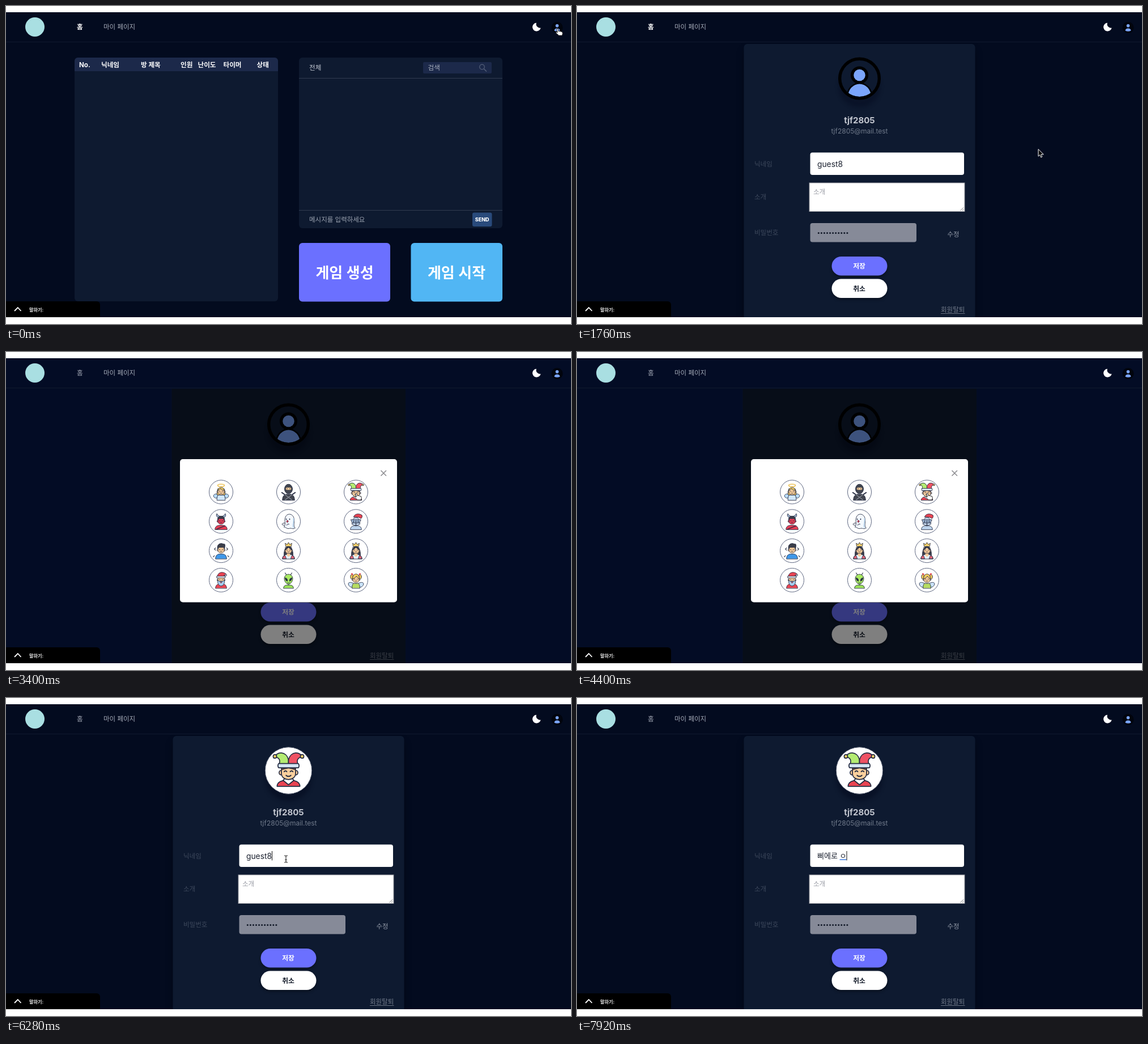
An HTML page with a canvas that plays this animation: 997x561 px, repeating every 8000 ms.

```html
<!DOCTYPE html>
<html lang="ko">
<head>
<meta charset="utf-8">
<title>Profile settings</title>
<style>
html, body { margin: 0; width: 100%; height: 100%; overflow: hidden; background: #fff; }
canvas { display: block; width: 997px; height: 561px; }
</style>
</head>
<body>
<canvas id="stage"></canvas>
<script>
const W = 997, H = 561, LOOP = 8000;
const FONT = 'Inter, "Noto Sans CJK KR", "Noto Sans KR", sans-serif';
const canvas = document.getElementById('stage');
const c = canvas.getContext('2d');
const dpr = window.devicePixelRatio || 1;
canvas.width = W * dpr;
canvas.height = H * dpr;

const INK = '#252c42', SKIN = '#fccf9c', BLUE = '#7ba5fb', PANEL = '#0e1a30';
const BG = '#030b1f', BG_MODAL = '#030c25';
const PAGE = 600, MODAL = 2280, PICK = 5800, FOCUS = 6240;

// drawing helpers
function box(x, y, x2, y2, r, fill) {
  c.beginPath();
  c.roundRect(x, y, x2 - x, y2 - y, r);
  c.fillStyle = fill;
  c.fill();
}
function text(s, x, cy, size, color, weight = 400, align = 'left') {
  c.font = `${weight} ${size}px ${FONT}`;
  c.textAlign = align;
  c.fillStyle = color;
  c.fillText(s, x, cy + size * 0.37);
  return c.measureText(s).width;
}
function line(d, color, width = 1) {
  c.strokeStyle = color;
  c.lineWidth = width;
  c.stroke(new Path2D(d));
}
function shape(d, fill, edge = INK, width = 0.9) {
  c.fillStyle = fill;
  c.fill(new Path2D(d));
  if (edge) line(d, edge, width);
}
function oval(x, y, rx, ry, fill, edge, width = 0.9) {
  c.beginPath();
  c.ellipse(x, y, rx, ry, 0, 0, 7);
  if (fill) { c.fillStyle = fill; c.fill(); }
  if (edge) { c.strokeStyle = edge; c.lineWidth = width; c.stroke(); }
}
function at(x, y, scale, draw) {
  c.save();
  c.translate(x, y);
  c.scale(scale, scale);
  c.lineCap = c.lineJoin = 'round';
  draw();
  c.restore();
}
function shadow(color, blur, dy, draw) {
  c.save();
  c.shadowColor = color;
  c.shadowBlur = blur * dpr;
  c.shadowOffsetY = dy * dpr;
  draw();
  c.restore();
}

// avatar parts, drawn around 0,0
function face(y, skin = SKIN, scale = 0.85) {
  at(0, y, scale, () => {
    oval(-7, 1, 1.6, 2, skin, INK);
    oval(7, 1, 1.6, 2, skin, INK);
    shape('M-6.5 -6H6.5V2C6 9 -6 9 -6.5 2Z', skin);
    line('M-4 0q1.2 -1.4 2.4 0M1.6 0q1.2 -1.4 2.4 0M-2.2 3.4q2.2 2 4.4 0', INK);
  });
}
function shoulders(fill, w = 10, y = 9) {
  shape(`M${-w} 14.5C${-w} ${y + 1} -5 ${y} -3 ${y}H3C5 ${y} ${w} ${y + 1} ${w} 14.5Z`, fill);
}
const people = {
  angel() {
    shape('M-5 4C-17 1 -15 12 -8 11ZM5 4C17 1 15 12 8 11Z', '#b9dcfb');
    shoulders('#cfe6fc', 7.5, 5);
    shape('M-7 5C-11 -12 11 -12 7 5Z', '#f8cf5e');
    face(-1);
    shape('M-6 -3C-5 -10 5 -10 6 -3Q1 -3 -1 -6Q-3 -3 -6 -3Z', '#f8cf5e');
    oval(0, -12, 6, 2.2, null, '#e9b83b', 1.4);
  },
  ninja() {
    line('M-12 1L7 14M12 1L-7 14', INK, 2);
    shoulders('#41454f', 11, 4);
    line('M-6 5L6 14M6 5L-6 14', '#8d929c', 1.2);
    oval(0, -5.5, 7.2, 8.5, '#41454f', INK);
    box(-4.8, -8, 4.8, -3.8, 2, SKIN);
    oval(-2.4, -5.8, 0.8, 0.8, INK);
    oval(2.4, -5.8, 0.8, 0.8, INK);
  },
  jester() {
    shoulders('#e94452', 10.5, 9);
    shape('M-5 9L0 13L5 9L3 7H-3Z', '#fff');
    face(1, SKIN, 1);
    shape('M-7 -3H7V0L4 -1L0 -2L-4 -1L-7 0Z', '#4b3f45', null);
    shape('M-8.5 -6C-7 -11 -10 -13 -13.5 -11.5C-11 -18 -2 -18 0 -10V-6Z', '#b4ec72');
    shape('M8.5 -6C7 -11 10 -13 13.5 -11.5C11 -18 2 -18 0 -10V-6Z', '#ef5264');
    shape('M-9 -6.5H9Q10.5 -4.5 9 -2.5H-9Q-10.5 -4.5 -9 -6.5Z', '#d5e5f5');
    oval(-12.5, -13, 1.6, 1.6, '#ffd567', INK);
    oval(12.5, -13, 1.6, 1.6, '#ffd567', INK);
  },
  devil() {
    shoulders('#e63e55', 11, 7);
    line('M-8 14L7 8', INK, 1.4);
    shape('M-5 -7C-9 -8 -9 -12 -7.5 -14Q-6 -10 -2 -9ZM5 -7C9 -8 9 -12 7.5 -14Q6 -10 2 -9Z', '#9fb4cf');
    face(-1, '#e63e55');
    shape('M-6 -2C-8 -12 8 -12 6 -2L4 -5H-4Z', '#3b3e49');
  },
  ghost() {
    shape('M-8 10C-4 5 -8 -1 -6 -6C-4 -16 9 -15 10 -4C11 4 8 8 12 12C7 15 5 11 1 13C-3 14 -5 10 -8 10Z', '#f4f9ff');
    line('M9 -5C10 4 6 8 9 11', '#c3ddf5', 2);
    oval(-4, -4, 0.9, 1.2, INK);
    oval(2, -4, 0.9, 1.2, INK);
    oval(-2, 0, 1.6, 2, '#e63e55', INK, 0.6);
    line('M-7 3C-13 3 -13 7 -8 7M1 5Q-3 4 -3 7', INK);
  },
  knight() {
    shoulders('#bdd4ed', 10, 8);
    shape('M-4 -8C-3 -14 6 -15 11 -11Q12 -7 9 -5Q7 -8 -4 -8Z', '#e94452');
    shape('M-7 5C-8 -11 8 -11 7 5Q0 10 -7 5Z', '#c9dcf3');
    shape('M-9 -3H9L6 3H-6Z', '#9fb8d6');
    line('M-4 -1V2M0 -1V2M4 -1V2M0 3V8', INK, 1.2);
  },
  boy() {
    shoulders('#3f97e8', 10, 6);
    face(-2);
    shape('M-6 -3C-9 -12 0 -15 4 -12Q9 -14 6 -3L5 -6H-4Z', '#3b3e49');
    line('M-10 -5L-12 -3L-10 -1M10 -5L12 -3L10 -1M-12 9L-14 11M12 9L14 11', INK, 1.2);
  },
  princess() {
    shape('M-8 10C-10 -14 10 -14 8 10Z', '#3b3e49');
    shoulders('#e3f0fc', 11, 7);
    shape('M-11 14Q-9 8 -6 9L-4 14ZM11 14Q9 8 6 9L4 14Z', '#ee6476');
    shape('M-3 5H3V8L0 11L-3 8Z', SKIN, null);
    face(-1);
    shape('M-6 -1C-6 -9 6 -9 6 -1Q3 -3 0 -6Q-3 -3 -6 -1Z', '#3b3e49');
    shape('M-5 -8L-6 -13.5L-2.5 -11L0 -15L2.5 -11L6 -13.5L5 -8Z', '#ffd567');
  },
  elder() {
    shoulders('#e94452', 10, 7);
    face(-1);
    shape('M-6 0L-4 2H4L6 0C8 14 -8 14 -6 0Z', '#a9cdee');
    oval(0, 4, 1.6, 0.9, '#e94452', INK, 0.6);
    shape('M-7 -6C-6 -15 4 -16 9 -11L8 -8L5 -9L7 -6Z', '#e94452');
    shape('M-7.5 -7H7.5V-4H-7.5Z', '#f4f9ff');
    oval(8.5, -9, 1.6, 1.6, '#f4f9ff', INK);
  },
  alien() {
    line('M-3 -8L-6 -13M3 -8L6 -13', INK, 1.1);
    shoulders('#9be158', 9, 9);
    shape('M0 8C-6 6 -9 -1 -7 -6C-4 -12 4 -12 7 -6C9 -1 6 6 0 8Z', '#a9ea62');
    shape('M-6 -4Q-1 -3 -2 2Q-6 1 -6 -4ZM6 -4Q1 -3 2 2Q6 1 6 -4Z', INK);
    line('M-2 5Q0 6 2 5', INK);
  },
  fairy() {
    shape('M-4 6C-18 -1 -15 13 -7 13ZM4 6C18 -1 15 13 7 13Z', '#cbe4fb');
    shoulders('#b6dc62', 7, 6);
    oval(-7.5, -6, 2.4, 4, '#f8cf5e', INK);
    oval(7.5, -6, 2.4, 4, '#f8cf5e', INK);
    face(-1.5);
    shape('M-6 -2C-7 -14 7 -14 6 -2Q3 -4 1 -7Q-2 -3 -6 -2Z', '#f8cf5e');
    line('M-6 -10L-7.5 -11.5M6 -10L7.5 -11.5', '#e94452', 2.2);
  }
};
const grid = ['angel', 'ninja', 'jester', 'devil', 'ghost', 'knight',
  'boy', 'princess', 'princess', 'elder', 'alien', 'fairy'];

function header(active, bg) {
  box(0, 11, W, 64, 0, bg);
  line('M0 63.5H997', '#101a2f');
  oval(51, 37, 17, 17, '#a9dfe2');
  text('홈', 125, 36.5, 11.5, active ? '#fff' : '#a5abb8', active ? 700 : 400);
  text('마이 페이지', 172, 36.5, 11.5, '#a5abb8');
  shape('M936 29.7A7.4 7.4 0 1 0 943.6 38.5A6.6 6.6 0 0 1 936 29.7Z', '#fff', null);
  oval(972.5, 38, 10, 10, '#01040d');
  oval(972.5, 34.8, 2.8, 2.8, BLUE);
  shape('M967.5 43.5C967.5 38 977.5 38 977.5 43.5Q972.5 46 967.5 43.5Z', BLUE, null);
}

function voiceBar() {
  box(0, 521, 166, 549, [0, 6, 0, 0], '#000');
  line('M15 538L20.8 532L26.5 538', '#fff', 1.8);
  text('말하기:', 41, 535.5, 8.2, '#e8e8e8', 600);
}

function lobby() {
  box(121, 91, 480, 521, 6, PANEL);
  box(121, 91, 480, 115, [6, 6, 0, 0], '#1c294a');
  [['No.', 129], ['닉네임', 168], ['방 제목', 238], ['인원', 308], ['난이도', 338.5], ['타이머', 383.5], ['상태', 442.5]]
    .forEach(([s, x]) => text(s, x, 103.5, 11.6, '#fff', 700));
  box(517, 91, 876, 392, 6, PANEL);
  line('M517 127.5H876M517 360.5H876', '#303b50');
  text('전체', 535, 109, 11.6, '#c3c9d4');
  box(736, 99, 857, 119, 2, '#1c294a');
  text('검색', 744.5, 109, 11.6, '#a9b0be');
  oval(840, 107.5, 4.3, 4.3, null, '#56617a', 1.2);
  line('M843.2 110.7L848 115.5', '#56617a', 1.3);
  text('메시지를 입력하세요', 535, 377, 11.5, '#9ca4b2');
  box(823, 364.5, 857.5, 389, 3, '#294a7b');
  text('SEND', 840.2, 377, 9, '#fff', 800, 'center');
  box(517, 418, 678, 521.5, 6, '#6b70ff');
  box(714.5, 418, 876, 521.5, 6, '#51b6f4');
  text('게임 생성', 597.5, 470, 26, '#fff', 600, 'center');
  text('게임 시작', 795, 470, 26, '#fff', 600, 'center');
}

function silhouette() {
  c.save();
  oval(498.5, 128, 34.5, 34.5, PANEL);
  c.clip();
  oval(498.5, 160, 23, 25, '#000');
  oval(498.5, 122, 15.5, 15.5, '#000');
  c.beginPath();
  c.arc(498.5, 128, 32, 0, 7);
  c.clip();
  oval(498.5, 160, 20.5, 22.5, BLUE);
  oval(498.5, 122, 10.3, 10.3, BLUE);
  c.restore();
  oval(498.5, 128, 34.8, 34.8, null, '#000', 5.4);
}

// typed nickname: [time, committed, composing]
const NICK = 'guest8';
const typing = [[0, NICK, '']];
for (let i = 1; i <= NICK.length; i++) typing.push([6420 + i * 60, NICK.slice(0, -i), '']);
typing.push([6960, '', 'ㅃ'], [7080, '', '삐'], [7180, '', '삥'], [7280, '삐', '에'],
  [7480, '삐', '엘'], [7600, '삐에', '로'], [7740, '삐에로 ', ''], [7880, '삐에로 ', 'ㅇ']);

function nickname(t) {
  const [key, done, open] = typing.findLast(k => k[0] <= t);
  const size = done && NICK.startsWith(done) ? 13.8 : 13;
  let x = 424;
  x += text(done, x, 278.5, size, '#1c2230');
  if (open) {
    const w = text(open, x, 278.5, size, '#1c2230');
    box(x, 284.5, x + w, 286, 0, '#3c7be0');
    x += w;
  }
  if (t >= FOCUS && (t - Math.max(key, FOCUS)) % 1000 < 500) box(x, 270, x + 1, 286.5, 0, '#111');
}

function profile(t, open) {
  if (open) box(292.5, 65, 705, 549, 0, PANEL);
  else shadow('rgba(0,0,0,.3)', 14, 10, () => box(294.5, 67, 702.5, 549, [6, 6, 0, 0], PANEL));
  if (t < PICK) {
    shadow('rgba(4,9,30,.4)', 6, 14, () => oval(498.5, 128, 37, 37, '#000'));
    silhouette();
  } else {
    shadow('rgba(4,9,30,.5)', 6, 12, () => oval(498.5, 128, 41.5, 41.5, '#fff'));
    oval(498.5, 128, 41.3, 41.3, null, '#3a4358', 1);
    at(498.5, 128, 1.92, people.jester);
  }
  text('tjf2805', 498.5, 201, 15, '#c2c6cf', 700, 'center');
  text('tjf2805@mail.test', 498.5, 220.5, 12, '#707a8b', 400, 'center');
  [['닉네임', 278.5], ['소개', 337], ['비밀번호', 399.5]].forEach(([s, y]) => text(s, 313, y, 11.5, '#3d485c'));
  box(411.5, 258.5, 683, 298, 4, '#fff');
  nickname(t);
  box(409.5, 311.5, 684.5, 363, 0, '#8b8e96');
  box(410.5, 312.5, 683.5, 362, 0, '#fff');
  text('소개', 417, 328, 11.5, '#9a9da6');
  line('M676.5 361L682 355.5M680 361L682 359', '#777');
  box(411.5, 383, 599, 416.5, 4, '#868a98');
  for (let i = 0; i < 11; i++) oval(426.3 + i * 5.06, 400.5, 1.5, 1.5, '#111827');
  text('수정', 653.5, 402.5, 11.5, '#929aa8');
  shadow('rgba(0,0,0,.35)', 5, 3, () => {
    box(449.5, 442, 547.5, 475.5, 17, '#6b70ff');
    box(449.5, 481.5, 547.5, 515, 17, '#fff');
  });
  text('저장', 498, 459, 11.8, '#fff', 700, 'center');
  text('취소', 498, 498.5, 11.8, '#111827', 700, 'center');
  text('회원탈퇴', 642, 536, 11.5, '#727b8b');
  line('M642 542.5H684.5', '#727b8b', 0.9);
}

function gear(x, y) {
  c.save();
  c.setLineDash([3, 2.2]);
  oval(x, y, 5.8, 5.8, null, '#777c84', 2.6);
  c.setLineDash([]);
  oval(x, y, 4.4, 4.4, null, '#777c84', 1.8);
  c.restore();
}

function modal() {
  box(292.5, 65, 705, 549, 0, 'rgba(0,0,0,.5)');
  box(307, 189, 690, 441.5, 5, '#fff');
  line('M661.5 209L671 218.5M671 209L661.5 218.5', '#8a8a8e', 1.5);
  grid.forEach((name, i) => {
    const x = 379.5 + (i % 3) * 119, y = 247 + Math.floor(i / 3) * 51.8;
    oval(x, y, 21, 21, '#fff', '#5d6680', 1);
    at(x, y, 0.98, people[name]);
  });
}

// pointer path: [time, x, y]
const path = [[0, 973, 40], [820, 973, 40], [1640, 814, 253], [1780, 814, 253], [2200, 503, 126],
  [2480, 503, 126], [3400, 618, 249], [5440, 618, 249], [5680, 605, 254], [5840, 605, 254], [6180, 494, 284], [LOOP, 494, 284]];
const cursors = {
  arrow: () => shape('M0 0V12.2L2.8 9.6L4.7 14L6.8 13.1L5 8.8H8.9Z', '#0a0a0a', '#fff', 1),
  hand: () => shape('M-1.2 .6Q0 -1 1.2 .6L2 4.6L4 4.2L6 5L8.5 5.6Q10 8 8.5 12H2.5L-2.6 7.2Q-3 5.6 -1.2 6L0 6.6Z', '#fff', '#111', 0.9),
  beam: () => line('M-2.6 -6Q0 -6 0 -4.4Q0 -6 2.6 -6M0 -4.4V4.4M-2.6 6Q0 6 0 4.4Q0 6 2.6 6M-1.3 1.5H1.3', '#222', 1.1)
};
function pointer(t) {
  if (t >= 6480) return;
  const i = path.findIndex(p => p[0] > t), [t0, x0, y0] = path[i - 1], [t1, x1, y1] = path[i];
  const u = (t - t0) / (t1 - t0), e = u * u * (3 - 2 * u);
  const x = x0 + (x1 - x0) * e, y = y0 + (y1 - y0) * e;
  const kind = t < 900 || (t > 3250 && t < 5560) ? 'hand' : t > PICK && y > 258.5 ? 'beam' : 'arrow';
  if (t < 3000 && Math.hypot(x - 498.5, y - 128) < 37) gear(498, 132);
  at(x, y, 1, cursors[kind]);
}

function draw(t) {
  c.setTransform(dpr, 0, 0, dpr, 0, 0);
  c.fillStyle = '#fff';
  c.fillRect(0, 0, W, H);
  c.save();
  c.beginPath();
  c.rect(0, 11, W, 538);
  c.clip();
  const open = t >= MODAL && t < PICK, bg = open ? BG_MODAL : BG;
  box(0, 11, W, 549, 0, bg);
  if (t < PAGE) lobby();
  else profile(t, open);
  if (open) modal();
  header(t < MODAL, bg);
  voiceBar();
  pointer(t);
  c.restore();
}

const start = performance.now();
function tick() {
  draw((performance.now() - start) % LOOP);
  requestAnimationFrame(tick);
}
tick();
</script>
</body>
</html>
```
